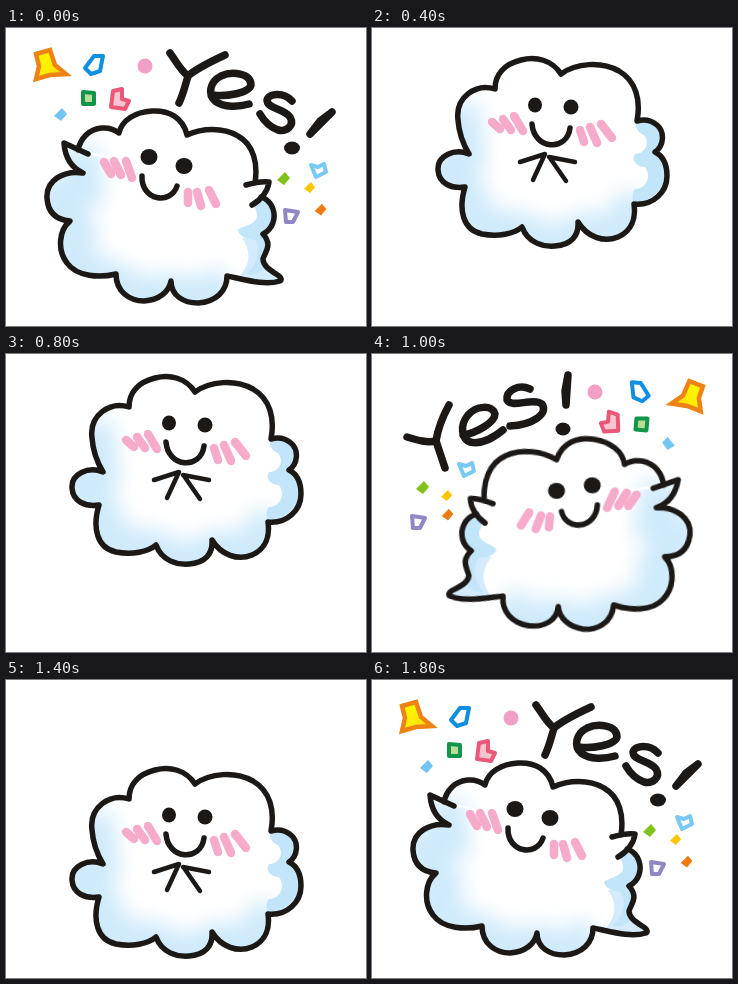
An HTML page for the animation above (2000 ms loop, 360 by 298 pixels).

```html
<!DOCTYPE html>
<html lang="en">
<head>
<meta charset="utf-8">
<title>Yes!</title>
<style>
html, body { margin: 0; width: 100%; height: 100%; overflow: hidden; background: #fff; }
svg { display: block; width: 360px; height: 298px; }
.ink { fill: none; stroke: #1c1816; stroke-width: 5.5; stroke-linecap: round; stroke-linejoin: round; }
.eye { fill: #1c1816; }
.blush { fill: none; stroke: #f6abcb; stroke-width: 8.5; stroke-linecap: round; }
.glow { fill: none; stroke: #cfeafb; stroke-width: 42; filter: url(#soft); }
.shade { fill: #c2e5fa; }
.pale { fill: #d3ebfc; }
.word { stroke-width: 7.5; }
.frame { fill: #fff; stroke-width: 4; stroke-linejoin: round; }

#rest, #tilt, #left, #right { animation: 2s step-end infinite; transform-origin: 0 0; }
#rest { animation-name: rest; }
#tilt { animation-name: tilt; }
#left { animation-name: left; }
#right { animation-name: right; }
@keyframes rest {
  0% { visibility: hidden; transform: none; }
  10% { visibility: visible; transform: none; }
  20% { visibility: visible; transform: translateY(-58px); }
  30% { visibility: visible; transform: none; }
  40% { visibility: visible; transform: translateY(-66px); }
  50% { visibility: hidden; transform: none; }
  70% { visibility: visible; transform: none; }
  80%, 100% { visibility: hidden; transform: none; }
}
@keyframes tilt {
  0%, 90%, 100% { visibility: visible; transform: translate(-22px, 60px); }
  10%, 70% { visibility: hidden; transform: none; }
  50% { visibility: visible; transform: translate(200px, 266px) rotate(5.6deg) translate(172px, -205px) scaleX(-1); }
  60% { visibility: visible; transform: none; }
  80% { visibility: visible; transform: translate(182px, 205px) rotate(5.6deg) translate(172px, -205px) scaleX(-1); }
}
@keyframes left {
  0%, 90%, 100% { visibility: visible; }
  10% { visibility: hidden; }
}
@keyframes right {
  0%, 60%, 100% { visibility: hidden; }
  50% { visibility: visible; }
}
</style>
</head>
<body>
<svg viewBox="0 0 360 298" role="img" aria-label="A cloud jumping and saying Yes!">
  <defs>
    <filter id="soft" x="-30%" y="-30%" width="160%" height="160%"><feGaussianBlur stdDeviation="10"/></filter>
    <linearGradient id="gold" x1="0" y1="0" x2="1" y2="1">
      <stop offset=".4" stop-color="#fff200"/><stop offset="1" stop-color="#fdd10f"/>
    </linearGradient>

    <path id="restLine" d="M123 119C104 113 83 127 86 150C87 164 91 174 97 184C82 178 65 186 66 200C67 214 80 219 93 217C86 240 91 260 110 264C126 267 142 264 150 257C156 273 171 277 183 276C199 275 207 266 206 252C215 267 232 273 246 267C260 261 264 248 262 234C281 236 295 222 295 206C295 194 291 186 283 182C292 176 293 162 285 155C279 150 272 149 265 151C269 130 264 111 247 101C229 91 204 93 189 104C180 90 164 86 149 90C133 94 123 104 123 119Z"/>
    <clipPath id="restClip"><use href="#restLine"/></clipPath>

    <path id="tiltLine" d="M104 66L80 55C81 69 86 79 99 85C80 82 62 92 63 110C64 126 74 132 86 133C75 142 73 162 83 175C93 189 116 190 132 186C132 204 146 213 160 213C175 212 185 204 187 193C187 208 200 215 214 215C232 214 243 203 243 188C259 191 280 198 296 193C298 192 297 190 295 188C286 182 279 178 279 171C281 164 289 157 279 146C289 141 292 130 289 121C287 115 283 111 277 109M268 117C277 112 284 103 285 94C277 93 269 95 262 97M271 95C274 76 270 57 254 48C239 39 218 40 203 47C199 29 184 22 168 23C151 24 138 32 135 45C125 37 110 39 102 47C97 52 95 57 94 62"/>
    <clipPath id="tiltClip"><use href="#tiltLine"/></clipPath>

    <path id="sun" stroke="#ee8214" stroke-width="4.5" fill="url(#gold)" d="M-14-11L0-15L5 0L16 9L0 10L-14 14L-11 1Z"/>
    <path id="sky" class="frame" stroke="#108fe0" d="M-9 3L0-9L9-9L6 6L-3 9Z"/>
    <circle id="dot" r="7.5" fill="#f19fc5"/>
    <path id="leaf" class="frame" stroke="#12944a" stroke-width="5" style="fill:#b9dc98" d="M-5-6L6-5L6 6L-5 6Z"/>
    <path id="rose" class="frame" stroke="#e95877" style="fill:#f9c3cf" d="M-6-8L3-10L3 0L10 2L6 10L-8 8Z"/>
    <path id="chip" d="M-7 1L1-7L6-1L0 6Z"/>
    <path id="ice" class="frame" stroke="#78c9f3" d="M-7-5L0-3L6-6L8 2L-2 7Z"/>
    <path id="plum" class="frame" stroke="#9088c4" d="M-6-6L7-4L2 6L-5 6Z"/>
  </defs>

  <g id="rest">
    <use href="#restLine" fill="#fff"/>
    <g clip-path="url(#restClip)">
      <path class="glow" d="M86 135L92 186L70 202L94 225L102 256L150 264L183 278L210 264L250 262L268 228"/>
      <path class="shade" d="M264 151C280 146 297 160 285 181C302 190 300 225 262 235C260 228 260 222 263 219C274 219 280 207 273 197C264 197 259 190 263 184C272 184 279 174 272 165C266 163 263 158 264 151Z"/>
    </g>
    <use href="#restLine" class="ink"/>
    <path class="blush" d="M120 152L128 159M131 149L139 160M142 146L151 161M208 160L212 172M218 157L225 173M229 154L240 168"/>
    <ellipse class="eye" cx="163" cy="135" rx="7" ry="7.5"/>
    <ellipse class="eye" cx="199" cy="137" rx="7.5" ry="7.5"/>
    <path class="ink" d="M160 154C162 180 195 182 198 158"/>
    <path class="ink" style="stroke-width:4.5" d="M148 192L173 184L161 210M203 192L177 187M178 188L194 211"/>
  </g>

  <g id="tilt">
    <use href="#tiltLine" fill="#fff"/>
    <g clip-path="url(#tiltClip)">
      <path class="glow" d="M94 60L98 100L72 112L92 145L86 178L132 196L158 210L190 206L216 213L245 196"/>
      <path class="pale" d="M258 150L284 150L280 172L298 194L254 190C266 178 268 164 258 150Z"/>
      <path class="shade" d="M272 113C291 109 297 137 279 146C288 157 284 169 280 171C284 182 274 188 262 186C273 178 277 162 271 152C262 151 255 148 254 142C260 137 272 137 273 128C273 121 269 119 272 113Z"/>
    </g>
    <use href="#tiltLine" class="ink"/>
    <path class="blush" d="M120 74L127 86M130 73L137 87M142 73L148 90M204 104L204 115M213 104L217 118M225 102L232 116"/>
    <ellipse class="eye" cx="165" cy="69" rx="8.5" ry="8"/>
    <ellipse class="eye" cx="200" cy="78" rx="8.5" ry="8"/>
    <path class="ink" d="M158 88C157 113 187 117 193 98"/>
  </g>

  <g id="left">
    <g class="ink word">
      <path d="M164 25C170 33 174 42 182 48M219 27C206 33 191 40 182 48C179 58 177 67 173 75"/>
      <path d="M207 67C220 69 243 65 245 57C245 45 226 43 215 48C203 54 202 67 209 73C218 80 233 79 243 76"/>
      <path d="M286 73C278 64 263 65 261 72C261 81 277 80 284 89C289 98 280 104 272 102C264 99 258 93 254 86"/>
      <path d="M326 84L304 106L314 93Z"/>
    </g>
    <ellipse class="eye" cx="286" cy="120" rx="8" ry="6.5"/>
    <use href="#sun" x="44" y="37"/>
    <use href="#sky" x="88" y="37"/>
    <use href="#dot" x="139" y="38"/>
    <use href="#leaf" x="82" y="70"/>
    <use href="#rose" x="113" y="71"/>
    <use href="#chip" x="55" y="87" fill="#74c5f2"/>
    <use href="#ice" x="312" y="142"/>
    <use href="#chip" x="278" y="151" fill="#7fc31c"/>
    <use href="#chip" transform="translate(304 160) scale(.85)" fill="#fdc400"/>
    <use href="#plum" x="285" y="188"/>
    <use href="#chip" transform="translate(315 182) scale(.9)" fill="#ee7a12"/>
  </g>

  <g id="right">
    <g class="ink word">
      <path d="M35 83C45 86 54 89 64 87M77 51C71 62 66 74 64 87C67 96 70 105 73 114"/>
      <path d="M91 81C105 79 123 68 123 60C120 50 104 52 96 61C87 72 90 85 98 88C110 91 121 84 131 76"/>
      <path d="M158 35C147 30 134 36 135 46C140 55 160 43 170 50C177 60 160 71 138 72"/>
      <path d="M196 21L194 51L193 37Z"/>
    </g>
    <ellipse class="eye" cx="191" cy="75" rx="7.5" ry="6.5"/>
    <use href="#sun" transform="translate(316 42) rotate(5) scale(-1 1)"/>
    <use href="#sky" transform="translate(268 38) rotate(5) scale(-1 1)"/>
    <use href="#dot" x="223" y="38"/>
    <use href="#leaf" transform="translate(270 70) rotate(5) scale(-1 1)"/>
    <use href="#rose" transform="translate(239 68) rotate(5) scale(-1 1)"/>
    <use href="#chip" transform="translate(296 90) rotate(5) scale(-1 1)" fill="#74c5f2"/>
    <use href="#ice" x="94" y="115"/>
    <use href="#chip" x="51" y="134" fill="#7fc31c"/>
    <use href="#chip" transform="translate(75 142) scale(.85)" fill="#fdc400"/>
    <use href="#plum" x="46" y="168"/>
    <use href="#chip" transform="translate(76 161) scale(.9)" fill="#ee7a12"/>
  </g>
</svg>
</body>
</html>
```
